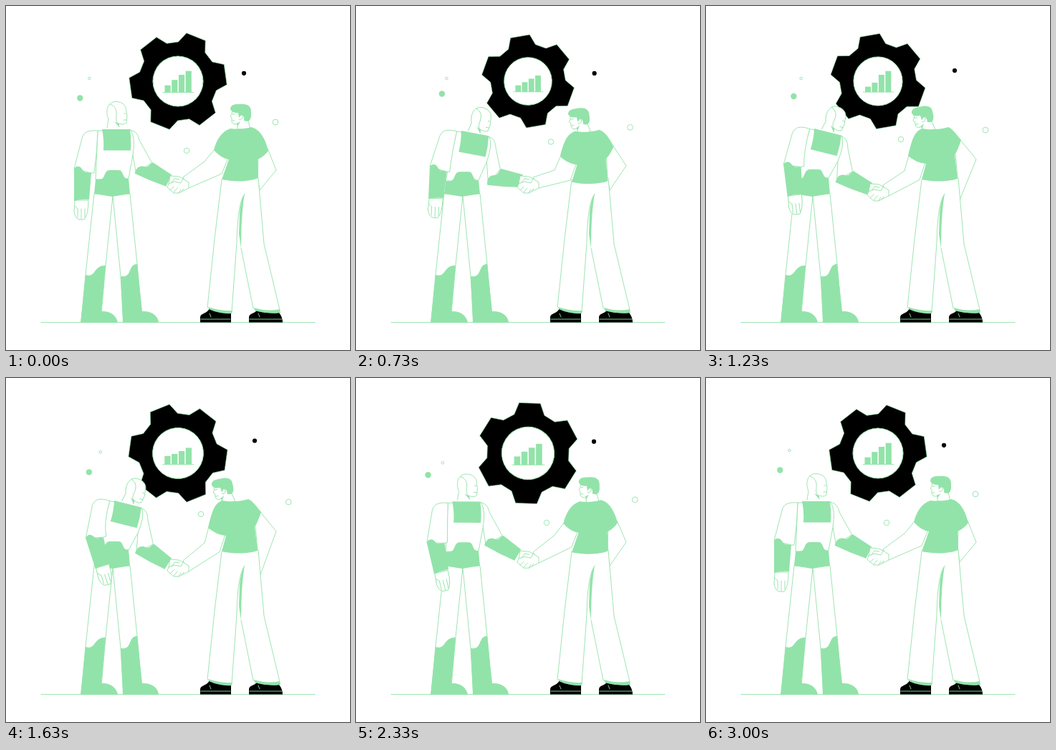
Write an HTML page that moves like this. It is 480 by 480 pixels and loops after 3030 ms.

```html
<!DOCTYPE html>
<html lang="en">
<head>
<meta charset="utf-8">
<title>Handshake</title>
<style>
  html, body { margin: 0; width: 100%; height: 100%; overflow: hidden; background: #fff; }
  svg { display: block; width: 100vw; height: 100vh; }
  .line { fill: none; stroke: #92e3a9; stroke-width: .9; stroke-linejoin: round; stroke-linecap: round; }
  .skin { fill: #fff; stroke: #92e3a9; stroke-width: .9; stroke-linejoin: round; }
  .green { fill: #92e3a9; }
  .black { fill: #000; }
  .white { fill: #fff; }
</style>
</head>
<body>
<svg viewBox="0 0 480 480">
  <g id="wheel">
    <path id="gear" class="black" stroke="#92e3a9" stroke-width=".6"/>
    <circle class="skin" r="35"/>
  </g>
  <g id="chart">
    <path class="line" d="M-21 15.5H22"/>
    <g id="bars" class="green"></g>
  </g>
  <circle id="blackDot" class="black" r="3.1"/>
  <circle id="greenDot" class="green" r="4.2"/>
  <circle id="tinyRing" class="skin" r="1.8"/>
  <circle id="sideRing" class="skin" r="3.9"/>
  <circle id="midRing" class="skin" r="3.7"/>

  <path class="line" d="M49 441.5H431"/>

  <!-- robot -->
  <path class="skin" d="M123 262L111 375L105 441H132L139 362L149 265L160 377L164 441H190L183 360L173 262Z"/>
  <path class="green" d="M111 375C126 380 121 362 139 362L133 426C146 425 155 433 156 442H104ZM160 377C177 380 169 361 183 360L190 426C203 425 213 433 213 442H163Z"/>
  <path id="farUpper" class="skin"/>
  <path id="torso" class="skin"/>
  <path id="waist" class="green"/>
  <path id="panel" class="green" d="M134 172H173Q175 186 174 201.500H136Q137 186 134 172Z"/>
  <g id="robotHead">
    <path class="skin" d="M141 170L143 158C138 146 142 133.500 153 133.500C163 133.500 168 139 168 148L169 153L168 163C165 166 161 165 157 164L158 169"/>
    <path class="line" d="M145 137C152 139 155 145 154 153C153 159 154 162 157 164M165 150L167 150M164 159H168"/>
    <path class="green" d="M151 161L157 164L158 169Z"/>
  </g>
  <path id="nearUpper" class="skin"/>
  <g id="nearFore">
    <path class="skin" d="M96 271L95 287Q97 298 103 298H109Q115 291 115 271Z"/>
    <path class="line" d="M100 283V295M105 283V297M110 283V295M96 279L100 283"/>
    <path class="green" d="M95 227C99 221 105 224 107 229C109 233 114 232 119 233L116 270Q105 269 95 272Z"/>
  </g>

  <!-- man -->
  <path id="backArm" class="skin"/>
  <path class="white" d="M301 242L281 421Q299 430 315 426L328 338L345 422Q363 430 382 424L360 332L352 240Z"/>
  <path class="line" d="M301 242L291 325L281 421M315 426L322 330Q323 275 333 262M328 338L345 422M382 424L360 332L352 240"/>
  <path class="black" d="M271 441.500V434C272 428 280 430 284 422Q298 429 314 428V441.500ZM339 441.500V434C340 428 347 430 350 424Q365 430 381 428Q386 434 386 441.500Z"/>
  <path class="line" d="M272 437H313M340 437H385M284 429L286 434M352 429L354 434"/>
  <path class="green" d="M333 262Q327 272 326 290L325 318L328 338Q328 290 333 262ZM282 420Q299 426 316 425L315 429Q298 430 283 423ZM346 421Q365 427 382 423L383 428Q364 430 347 425Z"/>
  <path id="frontArm" class="skin"/>
  <g id="manHead">
    <path class="skin" d="M316 145L315 151L313 154L315 156L315 162Q318 167 323 164L323 172H341L338 160V143Z"/>
    <path class="line" d="M316 151H319M316 160H319M326 153Q331 150 330 156Q328 160 325 158"/>
    <path class="green" d="M313 144C313 137 320 137 326 137C337 136 342 140 342 147V154Q341 160 337 161L332 160Q333 152 328 152L325 156L324 149Q316 150 313 144ZM322 164L327 161L323 168Z"/>
  </g>
  <path id="shirt" class="green"/>

  <!-- joined hands -->
  <path id="farFore" class="green" d="M-9 12C-11 3 -8 -2 0 -3C5 -4 4 -10 7 -13L38 -9V9Q14 12 -9 12Z"/>
  <g id="hands">
    <path class="skin" d="M-10 -12L2 -11L8 -8L16 -3L16 5L8 9L2 12L-5 12L-14 4L-12 -1Z"/>
    <path class="line" d="M-12 -1L-4 -4L5 -2L8 -8M-8 -2L-4 -8L3 -7M-10 8L-5 3M-5 11L0 5M2 12L5 7M6 10L9 6"/>
  </g>
</svg>
<script>
const $ = id => document.getElementById(id);
const LOOP = 3030, FRAMES = 90, CENTER = [240, 105];
const SHIRT_UP = "M313 171C300 175 293 189 290 201C297 209 304 213 311 214L301 242C320 246 340 245 352 240L351 214C358 211 363 206 366 202C362 186 355 172 342 169C332 172 322 172 313 171Z";
const SHIRT_BENT = "M302 171C291 175 288 184 282 209C289 215 297 219 307 220L301 242C320 246 340 245 351 241L347 208C350 203 353 196 356 187C350 180 345 172 338 169C325 173 312 173 302 171Z";

const rad = deg => deg * Math.PI / 180;
const cos = deg => Math.cos(rad(deg));
const sin = deg => Math.sin(rad(deg));
const mix = (a, b, m) => a + (b - a) * m;
const ease = (f, from, to) => {
  const u = Math.min(1, Math.max(0, (f - from) / (to - from)));
  return u * u * (3 - 2 * u);
};
// Eases from 0 to 1, holds, and eases back.
const hold = (f, rise, top, fall, end) => ease(f, rise, top) - ease(f, fall, end);
const bendAt = f => hold(f, 5, 30, 50, 72);
// The body sinks while it is between its two poses.
const dipAt = bend => 16 * bend * (1 - bend);

function mixPath(a, b, m) {
  const ends = b.match(/[\d.]+/g);
  let i = 0;
  return a.replace(/[\d.]+/g, v => mix(+v, +ends[i++], m).toFixed(2));
}
// Moves a rest point along with a part that turns about a pivot.
const mover = ([px, py], [x, y], deg) => (a, b) => [
  x + (a - px) * cos(deg) - (b - py) * sin(deg),
  y + (a - px) * sin(deg) + (b - py) * cos(deg)
];
const place = (id, [x, y], deg = 0, [px, py] = [0, 0]) =>
  $(id).setAttribute("transform", `translate(${x} ${y}) rotate(${deg}) translate(${-px} ${-py})`);
const draw = (id, ...parts) => $(id).setAttribute("d", parts.join(" "));

const polar = (r, deg) => [r * cos(deg), r * sin(deg)];
const teeth = Array.from({ length: 6 }, (_, i) => i * 60).flatMap(a =>
  [polar(68.4, a - 12), polar(68.4, a + 12), polar(55, a + 21.5), polar(55, a + 38.5)]);
draw("gear", "M", ...teeth, "Z");

const bars = Array.from({ length: 4 }, (_, i) => {
  const bar = document.createElementNS("http://www.w3.org/2000/svg", "rect");
  bar.setAttribute("x", -18.5 + 9.7 * i);
  bar.setAttribute("width", 8.2);
  return $("bars").appendChild(bar);
});

function drawWheel(turn) {
  const scale = 1 - 0.048 * sin(turn);
  $("wheel").setAttribute("transform", `translate(${CENTER}) rotate(${turn - 68}) scale(${scale})`);
  $("chart").setAttribute("transform", `translate(${CENTER}) scale(${scale})`);
  const heights = [
    9.6 + 2.3 * cos(4 * turn - 85),
    15.7 + 2.3 * cos(turn + 45),
    22 + 3.5 * cos(3 * turn - 45),
    27 + 4 * cos(3 * turn - 45)
  ];
  bars.forEach((bar, i) => {
    bar.setAttribute("y", 15.5 - heights[i]);
    bar.setAttribute("height", heights[i]);
  });
}

function drawDots(f, turn) {
  place("blackDot", [332 + 15 * hold(f, 20, 36, 50, 70), 91 + 4 * cos(turn - 45)]);
  place("greenDot", [111 + 12 * cos(turn - 130), 129 + 6.5 * cos(turn - 265)]);
  place("tinyRing", [124.5 + 8.5 * cos(turn - 165), 101 + 20 * hold(f, 46, 60, 64, 90)]);
  place("sideRing", [376 + 19 * hold(f, 0, 56, 62, 84), 162 + 11 * hold(f, 0, 36, 62, 84)]);
  place("midRing", [252 + 20 * hold(f, 0, 22, 62, 84), 195 + 9 * cos(turn - 320)]);
}

function drawRobot(f, turn, [hx, hy]) {
  const bend = bendAt(f), dip = dipAt(bend), sway = sin(turn);
  const rest = [154.5, 186], neck = [155, 150], elbow = [107, 228];
  const chest = [154.5 + 13 * bend, 186 + 3.5 * bend + dip], lean = 14 * bend;
  const nearElbow = [107 + 15 * bend - 3.5 * sway, 228 - 7 * bend + dip];
  const nearTurn = 13 * sway - 14 * bend;
  const farElbow = [193 + bend, 227 + 12 * bend + dip];
  const farTurn = Math.atan2(hy - 5.5 - farElbow[1], hx - 12 - farElbow[0]) * 180 / Math.PI;
  const t = mover(rest, chest, lean);
  const near = mover(elbow, nearElbow, nearTurn);
  const far = mover([0, 0], farElbow, farTurn);
  const w = dip - bend;

  place("panel", chest, lean, rest);
  place("robotHead", [155 + 26 * bend, 150 + 7 * bend + dip], 18 * bend, neck);
  place("nearFore", nearElbow, nearTurn, elbow);
  place("farFore", farElbow, farTurn);
  draw("farUpper", "M", t(173, 173), "C", t(183, 175), t(184, 181), t(186, 187),
    "L", far(6, -12), far(-8, 10), t(177, 208), "Z");
  draw("torso", "M", t(128, 174), "L", t(174, 173), "Q", t(181, 184), t(177, 208),
    "L", [171, 241 + w], [125, 242 + w], "Z");
  draw("waist", "M", [125, 242 + w], "H 131 C", [139, 242 + w], [136, 229 + w], [145, 229 + w],
    "H 157 C", [165, 229 + w], [161, 241 + w], [171, 241 + w], "L 173 262 L 148 266 L 123 262 Z");
  draw("nearUpper", "M", t(128, 174), "C", t(114, 173), t(108, 176), t(106, 185),
    "L", near(95, 227), near(119, 233), near(123, 233), "Q", t(127, 205), t(128, 174));
}

// The man follows the robot two frames later.
function drawMan(f, reach, [hx, hy]) {
  const bend = bendAt(f - 2), dip = dipAt(bend);
  const shirtPoint = (x1, y1, x2, y2) => [mix(x1, x2, bend), mix(y1, y2, bend) + dip];
  draw("shirt", mixPath(SHIRT_UP, SHIRT_BENT, bend));
  place("shirt", [0, dip]);
  place("manHead", [328 - 25 * bend, 150 + 3 * bend + dip], -11 * bend, [328, 150]);
  draw("frontArm", "M", shirtPoint(291, 200, 283, 208),
    "L", [277, 217 + 13 * bend + dip], [hx + 8, hy - 10], [hx + 16, hy + 5],
    [301 - 3 * bend, 234 + 8.5 * bend + dip], shirtPoint(310, 212, 306, 218));
  draw("backArm", "M", shirtPoint(365, 199, 355, 187),
    "L", [377, 229 - 15 * bend + dip], [354, 257 + 20 * reach],
    [351, 240], shirtPoint(352, 212, 348, 207));
}

function render(time) {
  const f = Math.floor((time % LOOP + 5) * 0.03) % FRAMES;
  const turn = f * 360 / FRAMES;
  const reach = hold(f, 22, 46, 58, 76);
  const clasp = [239, 249 + 16 * reach];
  drawWheel(turn);
  drawDots(f, turn);
  drawRobot(f, turn, clasp);
  drawMan(f, reach, clasp);
  place("hands", clasp);
}

const start = performance.now();
function tick() {
  render(performance.now() - start);
  requestAnimationFrame(tick);
}
tick();
</script>
</body>
</html>
```
